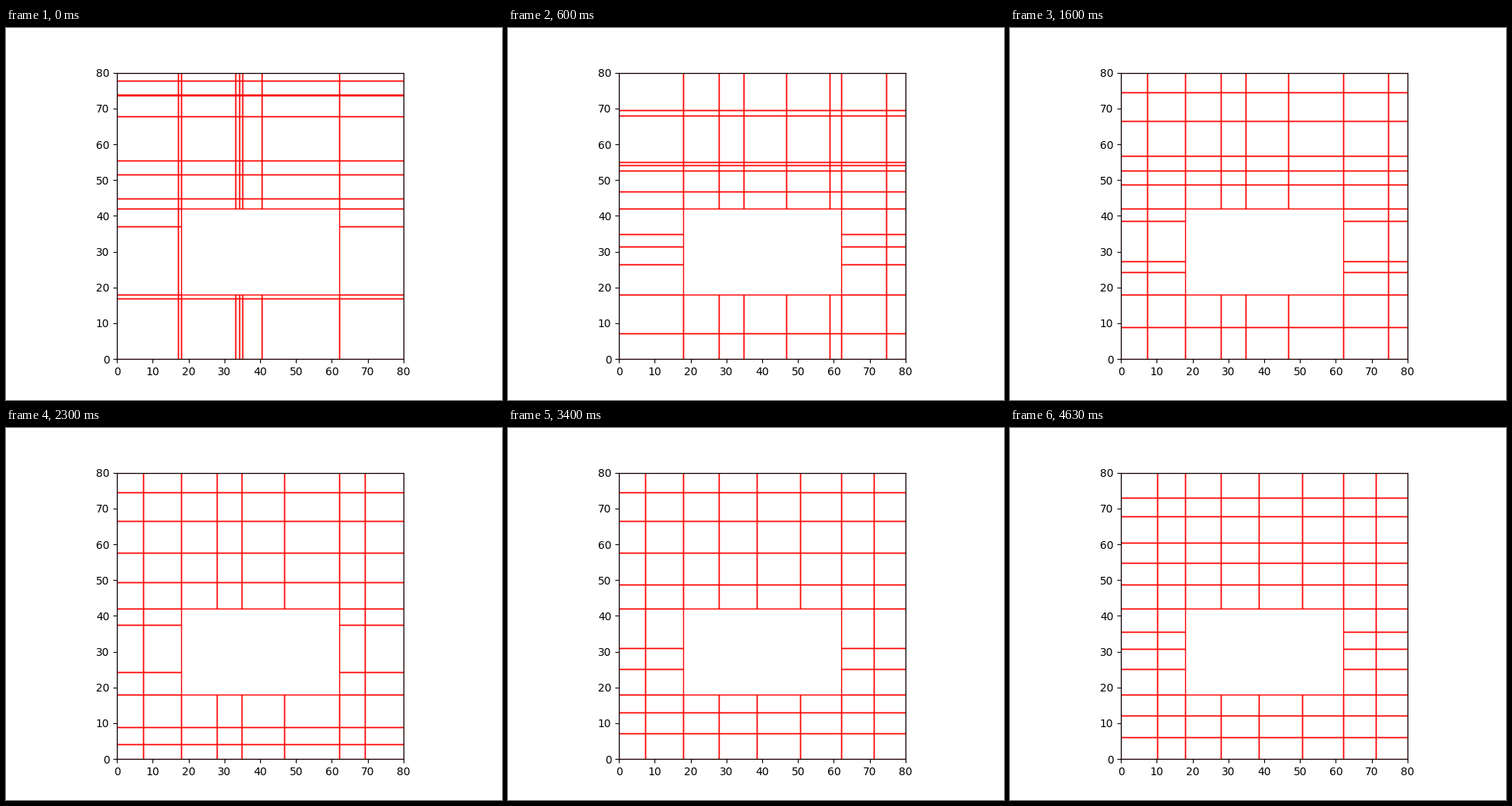
A matplotlib script for the animation above (4730 ms loop, 640 px wide and 480 px high).

```python
import random

import matplotlib.pyplot as plt
from matplotlib.animation import FuncAnimation
from matplotlib.collections import PolyCollection

SIZE = 80
HOLE_X, HOLE_Y = (18, 62), (18, 42)
LOOP, INTERVAL = 4730, 22
STAGES = [0, 6, 16, 23, 28, 40, 47]
_ = None

# Position of every cut at each stage of the search; _ means absent.
X_CUTS = [
    (17.1, _, 7.3, 7.3, 7.3, 10.1, 10.1),
    (33.1,) + (27.9,) * 6,
    (34.2,) + (34.8,) * 4 + (38.5,) * 2,
    (35.1, 58.8, _, _, _, _, _),
    (40.5,) + (46.7,) * 4 + (50.6,) * 2,
    (_, 74.6, 74.6, 69.2, 71.2, 71.2, 71.2),
]
Y_CUTS = [
    (77.8, 69.5, 74.5, 74.5, 74.5, 72.1, 73.0),
    (73.8, 68.0, 66.5, 66.5, 66.5, 66.5, 67.8),
    (73.6, 55.0, 56.8, 57.6, 57.6, 60.4, 60.4),
    (67.8, 54.2, _, _, _, 53.5, 54.8),
    (55.4, 52.6, 52.6, _, _, _, _),
    (51.5, 46.8, 48.7, 49.4, 48.7, 48.7, 48.7),
    (44.8, 34.9, 38.6, 37.5, 32.3, 31.0, 30.8),
    (37.0, 31.4, 27.3, _, _, _, 35.5),
    (_, 26.5, 24.3, 24.3, 24.3, 25.1, 25.1),
    (_, _, _, 8.9, 13.7, 12.2, 12.2),
    (16.9, 7.2, 8.9, 4.15, 7.2, 7.2, 6.1),
]
CUTS = X_CUTS + Y_CUTS


def step_at(ms):
    """Search step shown at a time; step 39 lasts only 30 ms."""
    return ms // 100 if ms < 3930 else 40 + (ms - 3930) // 100


def move(a, b, p):
    if a is None or b is None:
        return b if p > 0.5 else a
    return a + (b - a) * p


def cuts_at(step):
    """Within a stage the cuts move one after another in a shuffled order."""
    k = max(i for i in range(len(STAGES) - 1) if STAGES[i] <= step)
    u = (step - STAGES[k]) / (STAGES[k + 1] - STAGES[k])
    order = [i for i, c in enumerate(CUTS) if c[k] != c[k + 1]]
    random.Random(k).shuffle(order)
    pos = [c[k] for c in CUTS]
    for j, i in enumerate(order):
        p = min(max(u * len(order) - j, 0), 1)
        pos[i] = move(CUTS[i][k], CUTS[i][k + 1], p)
    return pos[:len(X_CUTS)], pos[len(X_CUTS):]


def spans(cuts, hole):
    edges = sorted([0, SIZE, *hole, *(c for c in cuts if c is not None)])
    return list(zip(edges, edges[1:]))


def inside(span, hole):
    return hole[0] <= span[0] and span[1] <= hole[1]


def cells(step):
    xs, ys = cuts_at(step)
    return [
        [(x[0], y[0]), (x[1], y[0]), (x[1], y[1]), (x[0], y[1])]
        for x in spans(xs, HOLE_X)
        for y in spans(ys, HOLE_Y)
        if not (inside(x, HOLE_X) and inside(y, HOLE_Y))
    ]


fig, ax = plt.subplots(figsize=(6.4, 4.8), dpi=100)
ax.set_aspect("equal")
ax.set(xlim=(0, SIZE), ylim=(0, SIZE),
       xticks=range(0, SIZE + 1, 10), yticks=range(0, SIZE + 1, 10))
grid = PolyCollection(cells(0), facecolors="none", edgecolors="red",
                      linewidths=1, joinstyle="miter")
ax.add_collection(grid, autolim=False)


def update(i):
    grid.set_verts(cells(step_at((i + 1) * INTERVAL - 1)))
    return [grid]


anim = FuncAnimation(fig, update, frames=LOOP // INTERVAL, interval=INTERVAL,
                     repeat=True, repeat_delay=0)
plt.show()
```
